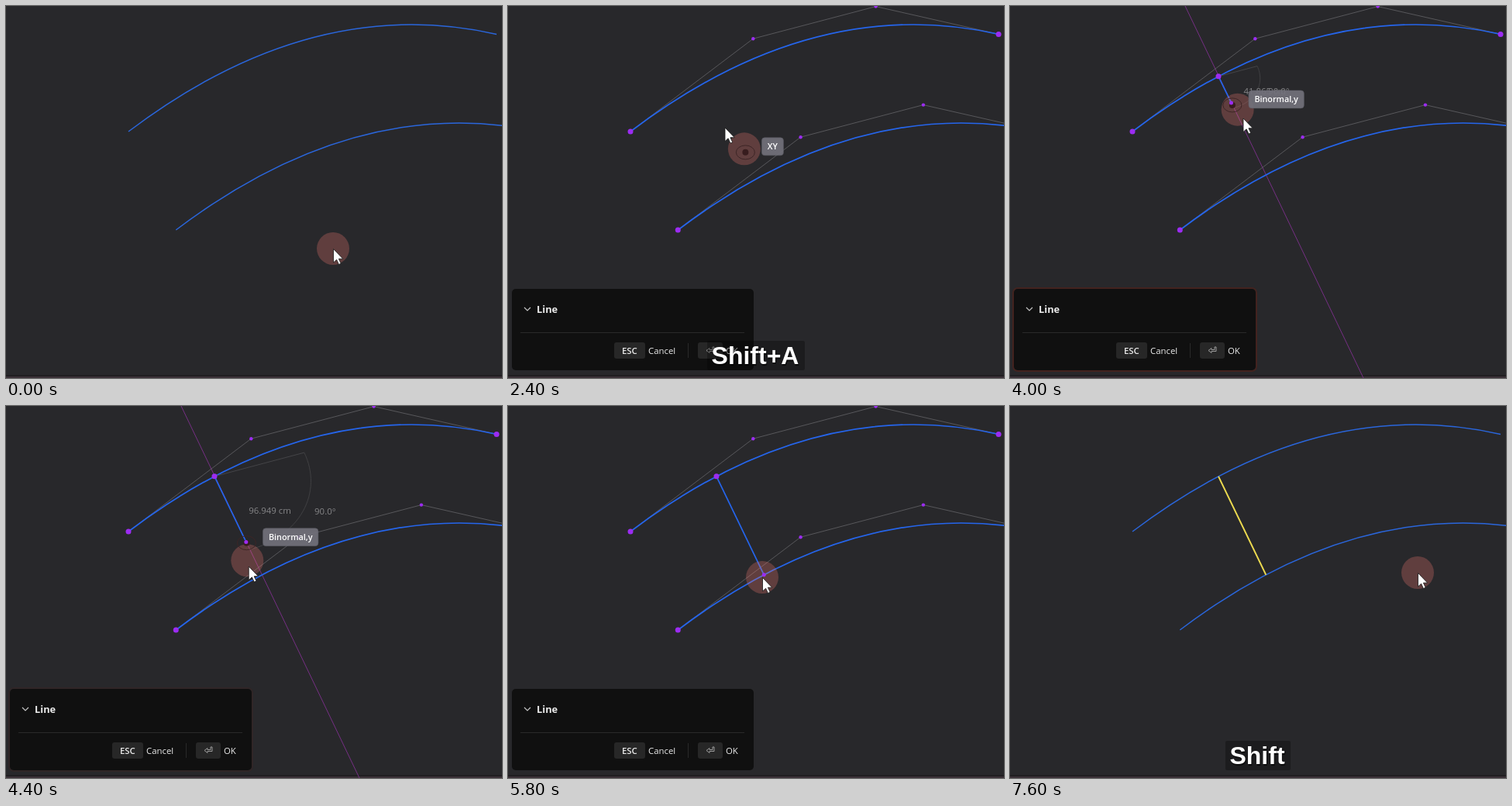
Animation of 640x480 px, one loop 8 s. Source, as an HTML page:

```html
<!DOCTYPE html>
<html lang="en">
<head>
<meta charset="utf-8">
<title>Line between two curves</title>
<style>
  html, body { margin: 0; width: 100%; height: 100%; overflow: hidden; background: #28282b; }
  svg { display: block; width: 640px; height: 480px; }
  text { font-family: "Open Sans", "Noto Sans", sans-serif; }
  .curve { fill: none; }
  .cage { fill: none; stroke: #646467; stroke-width: .8; }
  .dot { fill: #9c2cf2; }
  .measure { font-size: 11.4px; fill: #868688; }
  .button { fill: #272727; }
  .small { font-size: 11.4px; fill: #ececec; }
  .bold { font-weight: 600; }
  .keys { font: bold 32px "Liberation Sans", Arial, sans-serif; text-anchor: middle; }
</style>
</head>
<body>
<svg viewBox="0 0 640 480">
  <rect width="640" height="480" fill="#28282b"/>
  <rect y="476" width="640" height="2" fill="#201e21"/>
  <rect y="478" width="640" height="2" fill="#3b3138"/>

  <path id="axis" d="M226 0L456 480" stroke="#762f84"/>
  <g id="cages"></g>
  <g id="curves"></g>
  <g id="guide" fill="none" stroke-width=".9">
    <path id="base" stroke="#48484b"/>
    <path id="arc" stroke="#434346"/>
  </g>
  <path id="line"/>
  <g id="dots"></g>
  <circle id="startDot" class="dot" r="3.5"/>
  <text id="length" class="measure"></text>
  <text id="angle" class="measure"></text>

  <g id="panel">
    <rect id="flash" x="4" y="364" width="314" height="107" rx="6" fill="none" stroke="#43231f" stroke-width="2"/>
    <rect x="5" y="365" width="312" height="105" rx="5" fill="#101010"/>
    <path d="M21 389l4 4 4-4" fill="none" stroke="#c8c8c8" stroke-width="1.1"/>
    <text x="37" y="396" font-size="12.8" font-weight="700" fill="#ececec">Line</text>
    <path d="M16 421.5H305M232.5 435V454" stroke="#292929"/>
    <rect class="button" x="137" y="434" width="40" height="21" rx="3"/>
    <text x="147" y="449" class="small bold">ESC</text>
    <text x="181" y="449" class="small">Cancel</text>
    <rect class="button" x="245" y="434" width="32" height="21" rx="3"/>
    <path d="M264 440h2v5.500h-6v2l-4-3 4-3v2h4z" fill="none" stroke="#a8a8a8" stroke-width=".9"/>
    <text x="281" y="449" class="small">OK</text>
  </g>

  <circle id="halo" r="21" fill="#f87b75" opacity=".27"/>
  <g id="snap">
    <ellipse rx="12" ry="9" fill="none" stroke="#3d2526"/>
    <circle r="4" fill="#371c1e"/>
  </g>
  <circle id="endDot" class="dot" r="2.5"/>
  <g id="tag">
    <rect height="23" rx="4" fill="#72717b" stroke="#5c5c64" stroke-width=".6" opacity=".92"/>
    <text x="7.500" y="15.500" font-size="10.8" class="bold" fill="#fff"></text>
  </g>
  <path id="pointer" d="M0 0V17.500L4.100 13.800 7 20 9.700 18.800 6.900 12.700H12.200Z" fill="#fff" stroke="#171717" stroke-width=".8"/>

  <g id="caption">
    <rect y="432" height="38" rx="2" opacity=".3"/>
    <text class="keys" x="320" y="463.500" opacity=".55"></text>
    <text class="keys" x="319" y="462" fill="#fff"></text>
  </g>
</svg>
<script>
  const LOOP = 8000, STEP = 100, LAG = 70;
  const HULL = [[158, 162], [316.3, 42.2], [474.6, 0.6], [633, 36.4]];
  const OFFSET = [61.3, 127];
  const $ = id => document.getElementById(id);

  const linear = f => f;
  const easeIn = f => f ** 1.3;
  const easeOut = f => 1 - (1 - f) ** 2;
  const smooth = f => f * f * (3 - 2 * f);

  const REST = [422.5, 313.5];
  const MOVES = [
    { from: 1900, to: 2400, at: [280, 157], ease: easeIn },
    { from: 2400, to: 2650, at: [272, 62], ease: easeOut },
    { from: 2650, to: 3200, at: [270, 96], ease: smooth },
    { from: 3600, to: 4000, at: [301, 145], ease: easeIn },
    { from: 4000, to: 4700, at: [316, 221], ease: easeOut },
    { from: 4700, to: 5100, at: [328.5, 221.5], ease: linear },
    { from: 6550, to: 7400, at: [526.5, 215.5], ease: smooth }
  ];

  const mix = (p, q, f) => p.map((v, i) => v + (q[i] - v) * f);
  const within = (t, from, to) => t >= from && t < to;
  const progress = (t, from, to) => Math.min(1, Math.max(0, (t - from) / (to - from)));
  const show = (el, on) => el.setAttribute("display", on ? "inline" : "none");
  const place = (el, x, y) => el.setAttribute("transform", `translate(${x} ${y})`);
  function set(el, attrs) {
    for (const key in attrs) el.setAttribute(key, attrs[key]);
  }

  const pointerAt = t => MOVES.reduce(
    (p, { from, to, at, ease }) => mix(p, at, ease(progress(t, from, to))), REST);

  // Both curves share one hull; k picks the upper (0) or lower (1) one.
  const hull = k => HULL.map(p => p.map((v, i) => v + k * OFFSET[i]));
  function onCurve(k, s) {
    let p = hull(k);
    while (p.length > 1) p = p.slice(1).map((q, i) => mix(p[i], q, s));
    return p[0];
  }
  const A = onCurve(0, 0.2337), B = onCurve(1, 0.2337);

  const onAxisAt = t => within(t, 3700, 4500) || within(t, 5000, 5700);

  // The free end slides along the axis, then along the lower curve, then locks.
  function endAt(t) {
    if (t < 4500) return mix(A, B, 0.7 * smooth(progress(t, 3600, 4500)));
    if (t >= 5000) return B;
    const [x0] = hull(1)[0], x = pointerAt(t - LAG)[0];
    return onCurve(1, (x - x0) / (HULL[3][0] - HULL[0][0]));
  }

  function build() {
    let curves = "", cages = "", dots = "";
    for (const k of [0, 1]) {
      const p = hull(k);
      curves += `<path class="curve" d="M${p[0]}C${p.slice(1).join(" ")}"/>`;
      cages += `<polyline class="cage" points="${p.join(" ")}"/>`;
      dots += p.map(([x, y], i) =>
        `<circle class="dot" cx="${x}" cy="${y}" r="${i % 3 ? 2.2 : 3.5}"/>`).join("");
    }
    $("curves").innerHTML = curves;
    $("cages").innerHTML = cages;
    $("dots").innerHTML = dots;
    set($("startDot"), { cx: A[0], cy: A[1] });
  }

  function drawMeasure(end) {
    const v = [end[0] - A[0], end[1] - A[1]];
    const size = Math.hypot(...v);
    const u = [size * 1.215, -size * 0.322];
    const at = a => A.map((c, i) => c + Math.cos(a) * u[i] + Math.sin(a) * v[i] * 1.1);
    const points = Array.from({ length: 33 }, (_, i) => at(i / 32 * Math.PI / 2));
    set($("base"), { d: `M${A}L${at(0)}` });
    set($("arc"), { d: "M" + points.join("L") });

    const mid = at(Math.PI / 4);
    const slope = Math.atan2(v[1], v[0]) * 180 / Math.PI;
    set($("length"), { x: A[0] + v[0] / 2 + 23.5, y: A[1] + v[1] / 2 + 5 });
    set($("angle"), { x: mid[0] + 15, y: mid[1] + 4 });
    $("length").textContent = (size * 1.017).toFixed(3) + " cm";
    $("angle").textContent = (90 + Math.max(0, slope - 64.6) * 0.72).toFixed(1) + "°";
  }

  function drawTag(label, [x, y]) {
    show($("tag"), label);
    if (!label) return;
    const [box, text] = $("tag").children;
    text.textContent = label;
    set(box, { width: text.getComputedTextLength() + 15 });
    place($("tag"), x + 21, y - 19);
  }

  function drawCaption(label) {
    show($("caption"), label);
    if (!label) return;
    const [box, shade, text] = $("caption").children;
    shade.textContent = text.textContent = label;
    const width = text.getComputedTextLength() + 13;
    set(box, { x: 320 - width / 2, width });
  }

  function tagLabel(t) {
    if (within(t, 2000, 2800)) return "XY";
    if (within(t, 3700, 4500)) return "Binormal,y";
    return within(t, 2800, 5700) ? "Curve" : "";
  }

  function captionLabel(t) {
    if (within(t, 1400, 2600)) return "Shift+A";
    return within(t, 700, 1400) || t >= 7600 ? "Shift" : "";
  }

  function draw(time) {
    const t = Math.floor(time / STEP) * STEP;
    const editing = within(t, 1400, 6400);
    const started = t >= 3600;
    const measuring = within(t, 3700, 5700);
    const label = tagLabel(t);
    const halo = pointerAt(t - LAG);
    const end = endAt(t), tip = endAt(t - 20);
    const blue = { stroke: editing ? "#2565ec" : "#2a66dc", "stroke-width": editing ? 1.7 : 1.5 };

    for (const id of ["cages", "dots", "panel"]) show($(id), editing);
    for (const id of ["guide", "length", "angle"]) show($(id), measuring);
    show($("axis"), onAxisAt(t));
    show($("startDot"), editing && started);
    show($("endDot"), editing && (onAxisAt(t) || t >= 5700));
    show($("line"), started);
    if (measuring) drawMeasure(end);

    set($("curves"), blue);
    set($("line"), editing ? blue : { stroke: "#eedc50", "stroke-width": 2 });
    set($("line"), { d: `M${A}L${tip}` });
    set($("endDot"), { cx: tip[0], cy: tip[1] });
    set($("flash"), { opacity: Math.sin(Math.PI * progress(t, 3500, 4500)) });

    const snap = started ? end : label === "Curve" ? A : [halo[0] + 1, halo[1] + 4];
    show($("snap"), label && label !== "Curve");
    place($("snap"), ...snap);
    place($("halo"), halo[0] - 0.5, halo[1] - 0.5);
    place($("pointer"), ...pointerAt(t));
    drawTag(label, snap);
    drawCaption(captionLabel(t));
  }

  build();
  const start = performance.now();
  function tick() {
    draw((performance.now() - start) % LOOP);
    requestAnimationFrame(tick);
  }
  tick();
</script>
</body>
</html>
```
